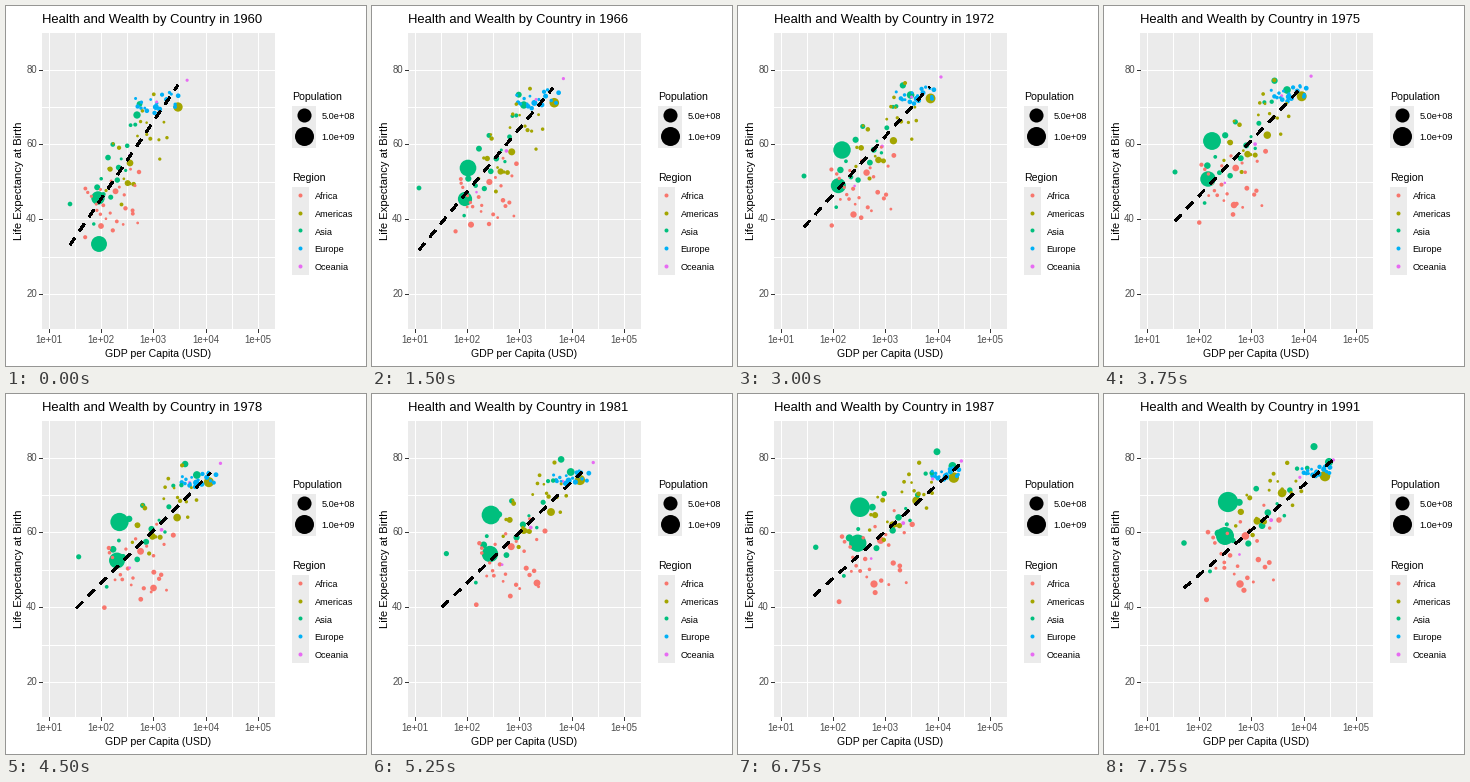
Animation of 360 by 360 pixels, one loop 8 s. Source, as a matplotlib script:

```python
import matplotlib.pyplot as plt
import numpy as np
from matplotlib.animation import FuncAnimation
from matplotlib.patches import Rectangle

SIZE, DPI = 360, 72
YEARS, STEP_MS = 32, 250
FIRST_YEAR = 1960
COLORS = {"Africa": "#F8766D", "Americas": "#A3A500", "Asia": "#00BF7D",
          "Europe": "#00B0F6", "Oceania": "#E76BF3"}

plt.rcParams["font.family"] = "Liberation Sans"
rng = np.random.default_rng(12)
fig = plt.figure(figsize=(SIZE / DPI, SIZE / DPI), dpi=DPI, facecolor="white")
ax = fig.add_axes([0, 0, 1, 1])
ax.set_xlim(0, SIZE)
ax.set_ylim(SIZE, 0)
ax.axis("off")


def diameter(millions):
    return 2.2 + 16.8 * np.sqrt(millions / 1000)


def box(x0, y0, x1, y1):
    ax.add_patch(Rectangle((x0, y0), x1 - x0, y1 - y0, color="#EBEBEB", lw=0, zorder=0))


def rule(x0, y0, x1, y1, color):
    ax.plot([x0, x1], [y0, y1], color=color, lw=1, zorder=1, antialiased=False,
            solid_capstyle="butt")


def label(x, y, text, size, color="black", ha="left", **kw):
    return ax.text(x, y, text, fontsize=size, color=color, ha=ha, va="baseline", **kw)


def dot(x, y, size, color):
    ax.scatter([x], [y], s=size ** 2, c=color, lw=0, zorder=3)


# --- panel, grid and axes ---
LEFT, TOP, RIGHT, BOTTOM = 36, 27, 269, 323
box(LEFT, TOP, RIGHT, BOTTOM)
for i in range(9):
    x = int(43.6 + 26.08 * i) - 0.5
    rule(x, TOP, x, BOTTOM, "white")
    if i % 2 == 0:
        rule(x, BOTTOM, x, BOTTOM + 3, "#333333")
        label(x + 0.5, 337, f"1e+{i // 2 + 1:02d}", 9.6, "#4D4D4D", "center")
for value in range(20, 90, 10):
    y = int(64 + 3.74 * (80 - value)) - 0.5
    rule(LEFT, y, RIGHT, y, "white")
    if value % 20 == 0:
        rule(LEFT - 3, y, LEFT, y, "#333333")
        label(31, y + 3.8, str(value), 9.6, "#4D4D4D", "right")

title = label(36, 17, "", 13)
label(152, 351, "GDP per Capita (USD)", 10.5, ha="center")
label(16, 175, "Life Expectancy at Birth", 11.3, ha="center", rotation=90,
      rotation_mode="anchor")

# --- legends ---
label(285.7, 94, "Population", 10.5)
box(286, 100, 310, 142)
for y, millions, text in ((108.7, 500, "5.0e+08"), (130, 1000, "1.0e+09")):
    dot(298, y, diameter(millions), "black")
    label(315.5, y + 4, text, 9.1)
label(285.7, 174.7, "Region", 10.5)
box(286, 180.5, 303, 268.5)
for i, (region, color) in enumerate(COLORS.items()):
    y = 189 + 17.7 * i
    dot(294, y, 4, color)
    label(308.7, y + 4.2, region, 9.1)


def glide(year, years, points):
    return np.array([np.interp(year, years, values) for values in zip(*points)])


# --- the largest and outermost countries follow a few key points ---
class Country:
    def __init__(self, region, pop, growth, **path):
        self.region, self.pop, self.growth = region, pop, growth
        self.years = [int(key[1:]) for key in path]
        self.path = list(path.values())

    def place(self, year):
        return glide(year, self.years, self.path)


# --- the others spread around the drifting centre of their region ---
class Follower:
    def __init__(self, region, pop, growth, cloud, u, v):
        self.region, self.pop, self.growth, self.cloud = region, pop, growth, cloud
        self.offset = np.array([u, v])
        self.period, self.phase = rng.uniform(9, 16), rng.uniform(0, 2 * np.pi)

    def place(self, year):
        centre = glide(year, (0, 21, 31), self.cloud["centre"])
        spread = glide(year, (0, 31), self.cloud["spread"])
        sway = 1.5 * np.sin(2 * np.pi * year / self.period + self.phase)
        return centre + spread * self.offset + (sway, 0)


# Centres at years 0, 21 and 31; spreads at the first and last year.
CLOUDS = {
    "Africa": dict(count=25, pop=5, growth=1.026, tilt=0.35,
                   centre=((105, 199), (135, 170), (136, 161)),
                   spread=((16, 18), (20, 25))),
    "Americas": dict(count=21, pop=4, growth=1.02, tilt=0.65,
                     centre=((130, 145), (162, 112), (164, 106)),
                     spread=((18, 29), (19, 19))),
    "Asia": dict(count=15, pop=12, growth=1.021, tilt=0.75,
                 centre=((110, 158), (146, 127), (158, 115)),
                 spread=((13, 25), (30, 26))),
    "Europe": dict(count=18, pop=9, growth=1.005, tilt=0.45,
                   centre=((151, 97), (199, 84), (213, 77)),
                   spread=((13, 6), (8, 3))),
    "Oceania": dict(count=4, pop=2, growth=1.018, tilt=0.95,
                    centre=((138, 128), (175, 115), (182, 109)),
                    spread=((25, 30), (27, 24))),
}

countries = [
    Country("Asia", 667, 1.0177, y0=(93, 238), y2=(88, 197), y6=(96, 162),
            y15=(108, 135), y21=(119, 121), y31=(124, 108)),
    Country("Asia", 450, 1.022, y0=(92, 192), y6=(93, 193), y15=(104, 173),
            y21=(118, 160), y31=(121, 142)),
    Country("Asia", 93, 1.009, y0=(131, 109), y15=(183, 84), y31=(225, 68)),
    Country("Asia", 21, 1.021, y0=(64, 198), y6=(47, 182), y9=(61, 174),
            y15=(71, 166), y31=(80, 149)),
    Country("Africa", 45, 1.026, y0=(95, 220), y9=(101, 218), y15=(130, 199),
            y21=(165, 189), y27=(136, 190)),
    Country("Africa", 18, 1.026, y0=(133, 166), y21=(173, 137), y31=(175, 126)),
    Country("Americas", 180, 1.011, y0=(172, 101), y21=(208, 86), y31=(221, 82)),
    Country("Americas", 72, 1.022, y0=(124, 157), y21=(179, 118), y31=(178, 99)),
]
for region, cloud in CLOUDS.items():
    steps = np.linspace(-1.7, 1.7, cloud["count"])
    tilt = cloud["tilt"]
    for u, v in zip(steps, rng.permutation(steps)):
        pop = min(cloud["pop"] * rng.lognormal(0, 1), 50)
        rise = -tilt * u + np.sqrt(1 - tilt ** 2) * v
        countries.append(Follower(region, pop, cloud["growth"], cloud, u, rise))
countries.sort(key=lambda c: -c.pop)

points = ax.scatter(np.zeros(len(countries)), np.zeros(len(countries)),
                    c=[COLORS[c.region] for c in countries], lw=0, zorder=4)

# --- trend line, as x0, y0, x1, y1 ---
TREND_YEARS = (0, 6, 9, 15, 21, 31)
TREND = ((64, 239, 172, 79), (47, 244, 181, 82), (61, 227, 184, 82),
         (71, 215, 199, 80), (70, 213, 210, 78), (80, 194, 230, 65))
trend, = ax.plot([], [], color="black", lw=1.6, ls=(0, (5.3, 5.3)), zorder=5,
                 dash_capstyle="butt", antialiased=False)


def draw(year):
    title.set_text(f"Health and Wealth by Country in {FIRST_YEAR + year}")
    points.set_offsets([c.place(year) for c in countries])
    points.set_sizes([diameter(c.pop * c.growth ** year) ** 2 for c in countries])
    x0, y0, x1, y1 = glide(year, TREND_YEARS, TREND)
    trend.set_data([x0, x1], [y0, y1])
    return title, points, trend


anim = FuncAnimation(fig, draw, frames=YEARS, interval=STEP_MS, repeat=True,
                     repeat_delay=0, blit=False)
plt.show()
```
